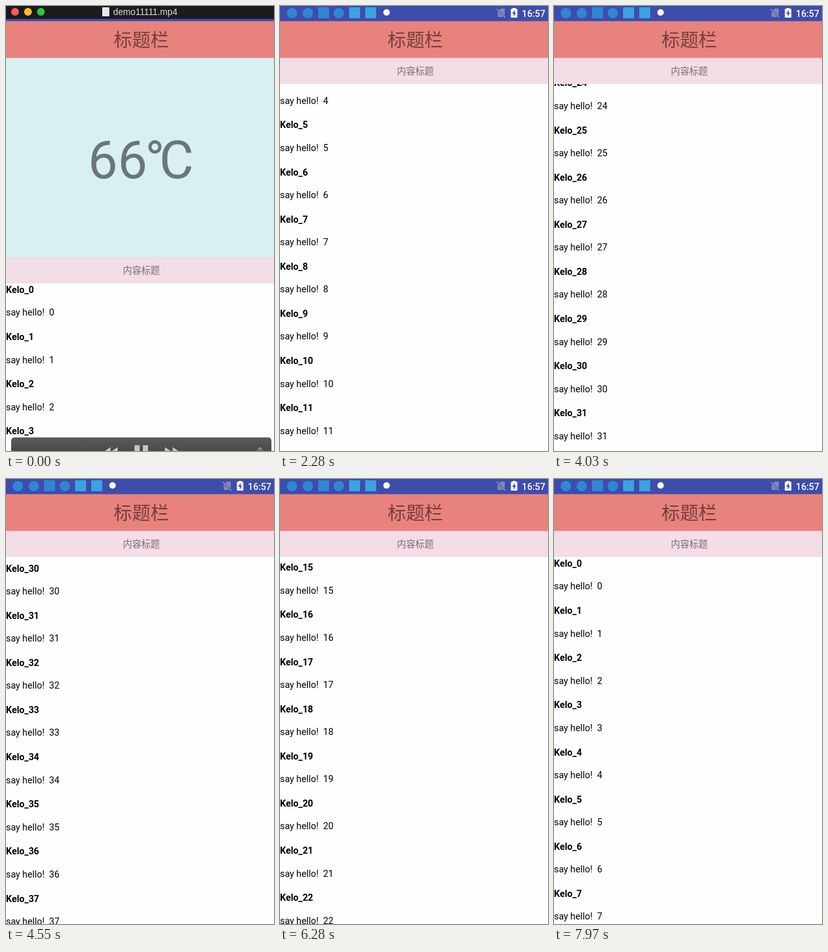
Recreate the animation shown at these times as an HTML page. Size 415 by 690 pixels, loop 8 s.

```html
<!DOCTYPE html>
<html lang="zh">
<head>
<meta charset="utf-8">
<style>
html, body { margin: 0; width: 100%; height: 100%; overflow: hidden; background: #fff; }
svg { display: block; width: 100%; height: 100%; }
text { font: 14.3px Roboto, "Noto Sans CJK SC", "Noto Sans CJK", sans-serif; white-space: pre; }
.soft { fill: #000; fill-opacity: .51; }
.name { font-weight: 700; }
</style>
</head>
<body>
<svg viewBox="0 0 415 690">
  <defs>
    <linearGradient id="panel" x2="0" y2="1">
      <stop stop-color="#5c5a5b"/><stop offset="1" stop-color="#3c3a3b"/>
    </linearGradient>
  </defs>

  <g id="page">
    <rect y="80" width="415" height="310" fill="#d9f0f2"/>
    <text class="soft" x="127" y="267" style="font-size:81.7px">66℃</text>
    <rect y="429.5" width="415" height="3200" fill="#fefefe"/>
    <g id="list"></g>
  </g>

  <g id="band">
    <rect width="415" height="41" fill="#f3dde6"/>
    <text class="soft" x="209.5" y="25.7" text-anchor="middle">内容标题</text>
  </g>

  <rect y="23" width="415" height="57.5" fill="#e8827d"/>
  <text class="soft" x="209.5" y="62.7" text-anchor="middle" style="font-size:28.6px">标题栏</text>

  <!-- status bar -->
  <rect width="415" height="23.5" fill="#3d4dab"/>
  <g fill="#2f86d6">
    <circle cx="18.5" cy="11" r="8"/>
    <circle cx="43" cy="11" r="8"/>
    <rect x="59" y="2" width="17" height="17"/>
    <circle cx="91" cy="11" r="8"/>
    <rect x="107" y="2" width="17" height="17" fill="#39a3e3"/>
    <rect x="132" y="2" width="17" height="17" fill="#39a3e3"/>
  </g>
  <circle cx="165" cy="10" r="5" fill="#fff"/>
  <path d="M337 17V9L342 4H348V17Z" fill="#8288b4"/>
  <path d="M335 4L349 18" stroke="#3d4dab" stroke-width="3"/>
  <path d="M335.5 4.5L349 18" stroke="#9a9fc4" stroke-width="1.3"/>
  <path d="M357.5 4.5H360V3H365V4.5H367.5V18H357.5Z" fill="#fff"/>
  <path d="M363.5 6L359.5 12H362V16.5L365.5 10.5H363.5Z" fill="#3d4dab"/>
  <text x="374.5" y="16.5" fill="#fff" style="font-weight:500">16:57</text>

  <!-- player window -->
  <g id="player">
    <rect width="415" height="20" fill="#1b1b1c"/>
    <circle cx="14" cy="9" r="6" fill="#fc5b57"/>
    <circle cx="34" cy="9" r="6" fill="#fdbc2e"/>
    <circle cx="54" cy="9" r="6" fill="#28c840"/>
    <rect x="149" y="2" width="11" height="14" fill="#e4e8ee"/>
    <text x="166" y="14" fill="#dcdcdc" style="font:13.8px 'Liberation Sans',sans-serif">demo11111.mp4</text>
    <rect x="8" y="669" width="403" height="40" rx="5" fill="url(#panel)"/>
    <path fill="#c6c5c6" d="M150 692L162 684V700ZM161 692L173 684V700ZM258 692L246 684V700ZM270 692L258 684V700ZM199 681H207V700H199ZM212 681H220V700H212Z"/>
    <path fill="none" stroke="#c6c5c6" d="M390 688L393.5 684.5L397 688M393.5 685V692M391 690H388.5V692M396 690H398.5V692"/>
  </g>
</svg>

<script>
const LOOP = 8000, FRAME = 80, ROWS = 40, PITCH = 73.15;
const TOP = 80.5, PIN = 309;
const $ = id => document.getElementById(id);

// one swipe each: start ms, end ms, scroll from, scroll to, slow-down power
const swipes = [
  [360, 1100, 0, PIN, 1.16],
  [2020, 2900, PIN, 878],
  [3290, 4090, 878, 2080],
  [4150, 5110, 2080, 2642],
  [5440, 6070, 2306, 1400],
  [6280, 7080, 1400, 766],
  [7170, 7800, 766, PIN]
];

function scrollAt(t) {
  const swipe = swipes.findLast(s => s[0] <= t);
  if (!swipe) return 0;
  const [start, end, from, to, power = 2.5] = swipe;
  if (t >= end) return to;
  const held = Math.floor((t - start) / FRAME) * FRAME;
  return to + (from - to) * (1 - held / (end - start)) ** power;
}

$("list").innerHTML = Array.from({ length: ROWS }, (_, i) => {
  const y = 445 + i * PITCH;
  return `<text class="name" y="${y}">Kelo_${i}</text>` +
         `<text y="${y + 35.4}">say hello!  ${i}</text>`;
}).join("");

function move(id, y) {
  $(id).setAttribute("transform", `translate(0 ${y})`);
}

function draw(t) {
  const scroll = scrollAt(t);
  move("page", -scroll);
  // whole-pixel band edge sits just under the title bar, so no row shows through
  move("band", Math.max(TOP - .5, Math.round(TOP + PIN - scroll - .5)));
  $("player").setAttribute("opacity", Math.max(0, Math.min(1, (640 - t) / 280)));
}

function tick(now) {
  draw(now % LOOP);
  requestAnimationFrame(tick);
}
draw(0);
requestAnimationFrame(tick);
</script>
</body>
</html>
```
